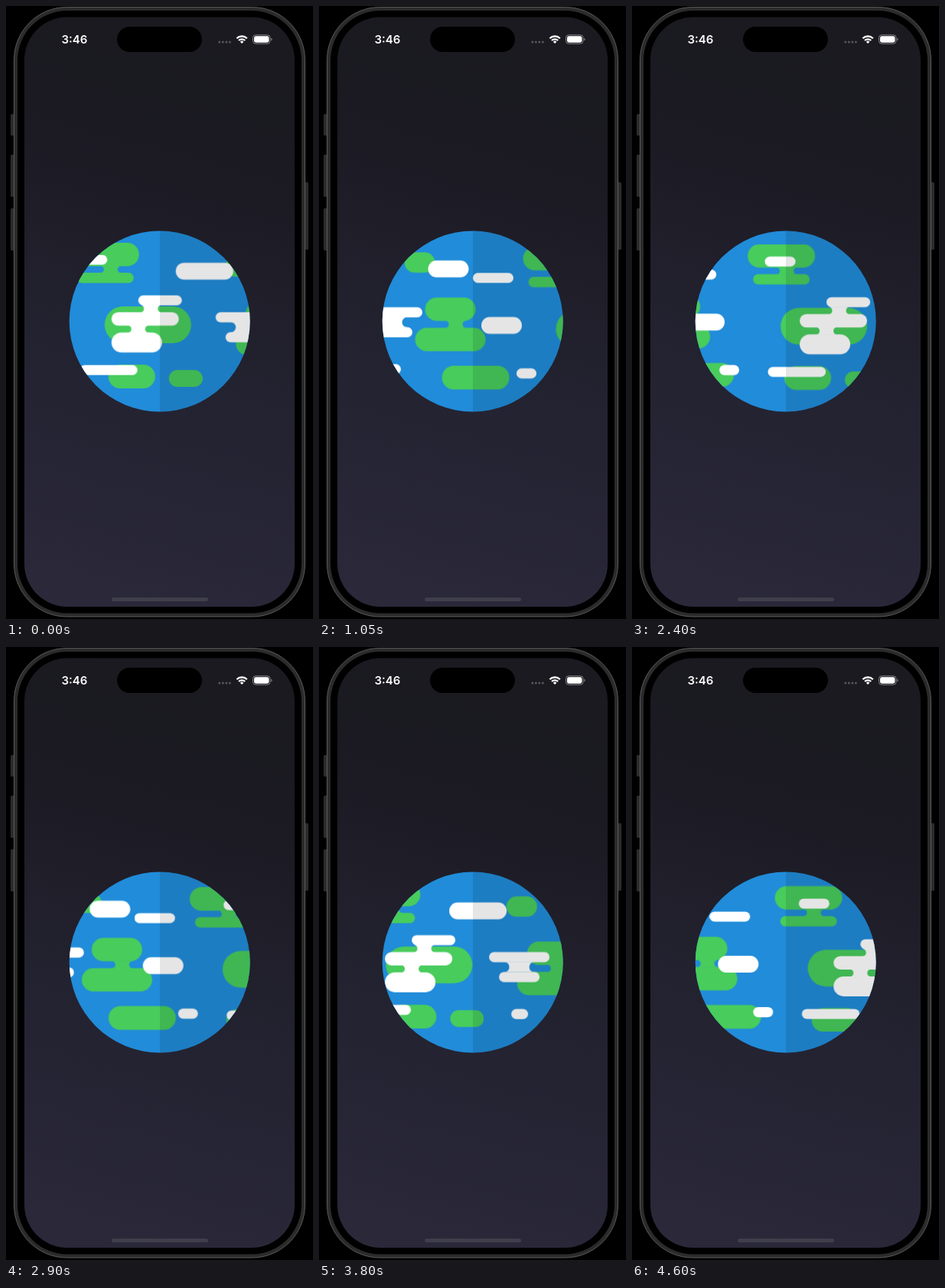
Animation, 401 px wide and 800 px high, one loop 4650 ms. Source, as an HTML page:

```html
<!DOCTYPE html>
<html lang="en">
<head>
<meta charset="utf-8">
<title>Spinning Earth</title>
<style>
  html, body { margin: 0; width: 100%; height: 100%; overflow: hidden; background: #000; }
  svg { display: block; }
  text { font: 600 15px Inter, sans-serif; fill: #fff; }

  /* --s is the drift per second; y follows x at a slope of 0.03 */
  .drift { animation: drift 4.65s -5ms infinite; }
  #land { --s: 177.75px; fill: #48cc5c; }
  #clouds { --s: 221.5px; fill: #fff; }

  @keyframes drift {
    0% {
      transform: translate(calc(var(--s) * -.367), calc(var(--s) * -.011));
      animation-timing-function: step-end;
    }
    1.07527% {
      transform: translate(calc(var(--s) * -.35), calc(var(--s) * -.0105));
      animation-timing-function: steps(92);
    }
    100% { transform: translate(calc(var(--s) * 4.25), calc(var(--s) * .1275)); }
  }
</style>
</head>
<body>
<svg width="401" height="800" viewBox="0 0 401 800">
  <defs>
    <linearGradient id="night" x1=".56" y1="0" x2=".44" y2="1">
      <stop offset="0" stop-color="#1a1a20"/>
      <stop offset=".22" stop-color="#1b1a22"/>
      <stop offset=".6" stop-color="#232230"/>
      <stop offset="1" stop-color="#2a2839"/>
    </linearGradient>
    <clipPath id="globe"><circle cx="200.7" cy="411.5" r="118"/></clipPath>
  </defs>

  <g fill="#2c2c2c">
    <rect x="6" y="141" width="6" height="28" rx="1.5"/>
    <rect x="6" y="194" width="6" height="55" rx="1.5"/>
    <rect x="6" y="264" width="6" height="55" rx="1.5"/>
    <rect x="389" y="230" width="6" height="88" rx="1.5"/>
  </g>
  <rect x="10.5" y="1.5" width="380" height="795.5" rx="69" fill="#2b2b2b" stroke="#5a5a5a"/>
  <rect x="15" y="6" width="371" height="786.5" rx="65"/>
  <rect x="24" y="14.5" width="353" height="769.5" rx="56" fill="url(#night)"/>

  <rect x="145" y="27" width="111" height="33" rx="16.5"/>
  <text x="72.5" y="49">3:46</text>
  <g fill="#56565d">
    <circle cx="278.8" cy="47" r="1.5"/>
    <circle cx="283.3" cy="47" r="1.5"/>
    <circle cx="287.9" cy="47" r="1.5"/>
    <circle cx="292.4" cy="47" r="1.5"/>
  </g>
  <g fill="none" stroke="#fff" stroke-width="2.3">
    <path d="M301.4 42.2a9.6 9.6 0 0 1 13.4 0"/>
    <path d="M304 45a5.9 5.9 0 0 1 8.2 0"/>
  </g>
  <path d="M308.1 49.1l-2.3-2.4a3.3 3.3 0 0 1 4.6 0z" fill="#fff"/>
  <rect x="322.5" y="37.8" width="22.5" height="11.4" rx="3.6" fill="none" stroke="#85858a"/>
  <rect x="324" y="39.3" width="19.5" height="8.4" rx="2.4" fill="#fff"/>
  <path d="M346.3 41.5a2.2 2.2 0 0 1 0 4z" fill="#85858a"/>

  <g clip-path="url(#globe)">
    <path d="M82 293h238v238H82z" fill="#218cd9"/>
    <g id="land" class="drift"></g>
    <g id="clouds" class="drift"></g>
    <path d="M201 293h119v238H201z" opacity=".1"/>
  </g>
  <rect x="138" y="772" width="126" height="5" rx="2.5" fill="#3f3e4b"/>
</svg>
<script>
  const pill = (x, y, w, h) =>
    `<rect x="${x}" y="${y}" width="${w}" height="${h}" rx="${Math.min(w, h) / 2}"/>`;

  // Bridge between two pills, hollowed by a round notch on each side
  const neck = (x1, x2, y, h) => {
    const r = h / 2, arc = `A${r} ${r} 0 0 1`;
    return `<path d="M${x1 - r} ${y}${arc} ${x1 - r} ${y + h}H${x2 + r}${arc} ${x2 + r} ${y}z"/>`;
  };

  const tile = (id, shapes, period, first) => {
    let out = '';
    for (let k = first; k <= 3; k++)
      out += `<g transform="translate(${-k * period} ${-k * period * .03})">${shapes.join('')}</g>`;
    document.getElementById(id).innerHTML = out;
  };

  tile('land', [
    pill(151, 311, 88, 30.5), neck(193, 211, 341, 9.5), pill(158, 350, 74, 13.5),
    pill(194, 394, 113, 48),
    pill(199, 470, 61, 31),
    pill(45, 466, 88, 31),
    pill(23, 377, 66, 30.5), neck(54, 72, 407, 10), pill(10, 416.5, 92, 30.5),
    pill(278, 477, 44, 22),
    pill(-4, 318, 40, 26.5)
  ], 355.5, -1);

  tile('clouds', [
    pill(254, 380, 57, 13), neck(261.5, 279.5, 392.5, 10),
    pill(219, 402, 88, 17.5), neck(245, 263, 419, 10), pill(219, 428.5, 66, 26),
    pill(177.5, 471, 75.5, 13),
    pill(173.5, 327, 40, 13),
    pill(303, 337.4, 75, 22),
    pill(355, 402, 79, 13.3), neck(381.5, 407.5, 415, 13.2), pill(368, 428, 53, 13.3),
    pill(441.5, 341, 53, 22),
    pill(57, 344, 53, 13),
    pill(68, 401.5, 53, 22),
    pill(114, 468.5, 26, 13.3),
    pill(384, 476.3, 22, 13.3)
  ], 443, 0);
</script>
</body>
</html>
```
